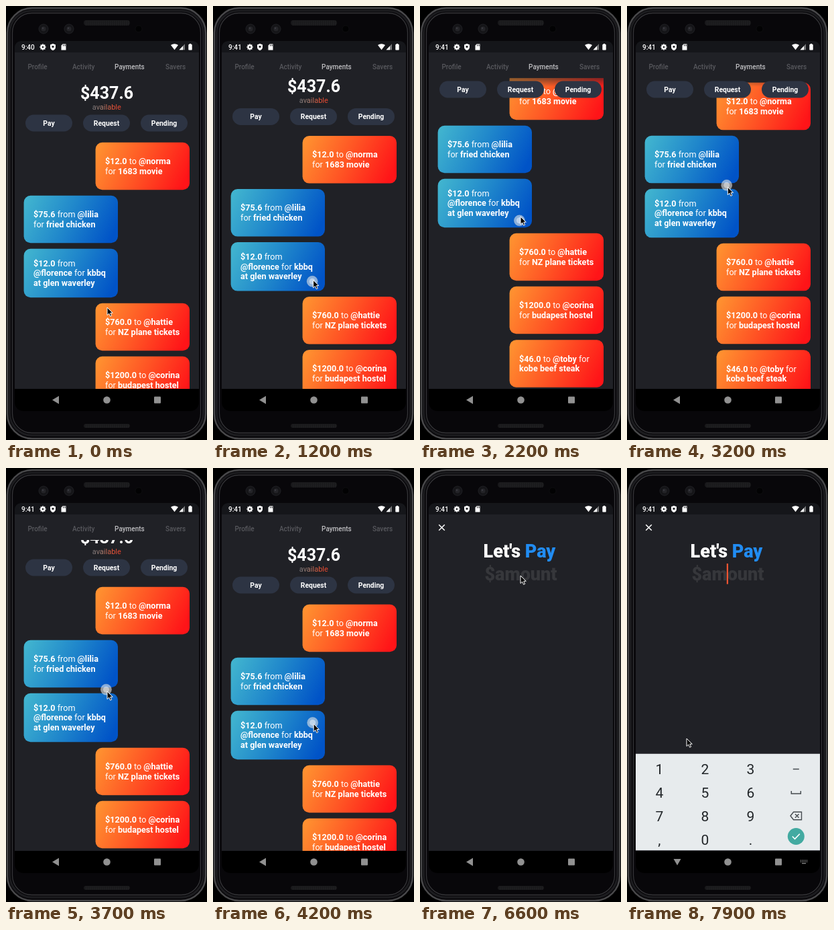
An HTML page with a canvas for the animation above (8000 ms loop, 300x645 px).

```html
<!DOCTYPE html>
<html lang="en">
<head>
<meta charset="utf-8">
<title>Payments app</title>
<style>
html, body { margin: 0; width: 300px; height: 645px; overflow: hidden; background: #000; }
canvas { display: block; width: 300px; height: 645px; }
</style>
</head>
<body>
<canvas id="stage"></canvas>
<script>
const LOOP = 8000, STEP = 100, MAX_SCROLL = 113, BG = '#202126';
const canvas = document.getElementById('stage');
const c = canvas.getContext('2d');
const dpr = window.devicePixelRatio || 1;
canvas.width = 300 * dpr;
canvas.height = 645 * dpr;

// [sent, top, lines]; asterisks toggle bold
const cards = [
  [1, 203, ['*$12.0* to *@norma', 'for *1683 movie']],
  [0, 282, ['*$75.6* from *@lilia', 'for *fried chicken']],
  [0, 361, ['*$12.0* from', '*@florence* for *kbbq', '*at glen waverley']],
  [1, 442, ['*$760.0* to *@hattie', 'for *NZ plane tickets']],
  [1, 521, ['*$1200.0* to *@corina', 'for *budapest hostel']],
  [1, 600.5, ['*$46.0* to *@toby* for', '*kobe beef steak']]
];

// [time, x, y] of the pointer tip
const path = [
  [0, 151, 448], [600, 151, 438], [900, 150, 416], [1700, 149, 393],
  [2200, 150, 313], [2600, 150, 246], [3000, 150, 244], [3700, 151, 332],
  [4300, 150, 390], [4600, 150, 392], [5300, 66, 178], [6000, 66, 178],
  [6500, 150, 160], [7100, 150, 160], [7800, 89, 402], [8000, 89, 402]
];
const touches = [[700, 4400], [5700, 5900], [6700, 6850]];

const clamp = (v, lo = 0, hi = 1) => Math.min(hi, Math.max(lo, v));
const ease = (t, from, to) => 1 - (1 - clamp((t - from) / (to - from))) ** 3;

function pointerAt(t) {
  t = clamp(t, 0, LOOP - 1);
  const i = path.findIndex(p => p[0] > t);
  const [t0, x0, y0] = path[i - 1], [t1, x1, y1] = path[i];
  const k = (t - t0) / (t1 - t0);
  return [x0 + (x1 - x0) * k, y0 + (y1 - y0) * k];
}

function scrollAt(t) {
  const grip = t < 2800 ? 417 : 358;
  return t > 4600 ? 0 : clamp(grip - pointerAt(t)[1], 0, MAX_SCROLL);
}

function rect(x, y, w, h, r, fill, stroke, width = 1) {
  c.beginPath();
  c.roundRect(x, y, w, h, r);
  paint(fill, stroke, width);
}

function disc(x, y, r, fill, stroke, width) {
  c.beginPath();
  c.arc(x, y, r, 0, Math.PI * 2);
  paint(fill, stroke, width);
}

function shape(d, x, y, fill, stroke, width) {
  c.save();
  c.translate(x, y);
  const p = new Path2D(d);
  if (fill) { c.fillStyle = fill; c.fill(p); }
  if (stroke) { c.strokeStyle = stroke; c.lineWidth = width || 1; c.stroke(p); }
  c.restore();
}

function paint(fill, stroke, width) {
  if (fill) { c.fillStyle = fill; c.fill(); }
  if (stroke) { c.strokeStyle = stroke; c.lineWidth = width; c.stroke(); }
}

function text(str, x, y, size, weight, color, align = 'center') {
  c.font = `${weight} ${size}px Roboto, sans-serif`;
  c.textAlign = align;
  c.fillStyle = color;
  c.fillText(str, x, y);
  return c.measureText(str).width;
}

function richText(str, x, y) {
  str.split('*').forEach((part, i) => {
    x += text(part, x, y, 12.6, i % 2 ? 700 : 400, '#fff', 'left');
  });
}

function gradient(x0, y0, x1, y1, ...stops) {
  const g = c.createLinearGradient(x0, y0, x1, y1);
  stops.forEach((s, i) => g.addColorStop(i / (stops.length - 1), s));
  return g;
}

function clipTo(x, y, w, h, draw) {
  c.save();
  c.beginPath();
  c.rect(x, y, w, h);
  c.clip();
  draw();
  c.restore();
}

function drawSpeaker(y, h) {
  rect(116, y, 69, h, h / 2, '#19191b');
  c.fillStyle = '#29292c';
  for (let x = 119; x < 183; x += 3)
    for (let row = 1.5; row < h - 1; row += 2.5) c.fillRect(x, y + row, 1.3, 1);
}

function drawPhone() {
  c.fillStyle = '#000';
  c.fillRect(0, 0, 300, 645);
  rect(2, 3, 296, 640, 37, '#08070a', '#48484a', 2.5);
  rect(5.5, 7, 289, 631, 33, null, '#1c1c1f', 3);
  rect(9.5, 10.5, 281, 624, 29, null, '#343437', 1.3);
  drawSpeaker(21, 8);
  drawSpeaker(621, 6);
  for (const x of [56, 94]) {
    disc(x, 34, 7, '#151518', '#202024', 1);
    disc(x, 34, 3.5, '#242428');
    disc(x - 1, 33, 1.2, '#3a3a40');
  }
  disc(198, 34, 5, '#020203', '#0e0e10', 1);
  rect(13, 52, 275, 550, [9, 9, 13, 13], '#000');
  rect(13, 52, 275, 18, [9, 9, 0, 0], '#15161a');
  c.fillStyle = BG;
  c.fillRect(13, 69, 275, 500);
}

function drawStatus(t) {
  text(t < 500 ? '9:40' : '9:41', 23, 65, 10, 500, '#fff', 'left');
  for (let a = 0; a < 8; a++) {
    c.save();
    c.translate(55, 61);
    c.rotate(a * Math.PI / 4);
    c.fillStyle = '#fff';
    c.fillRect(-1, -4.5, 2, 3);
    c.restore();
  }
  disc(55, 61, 2.5, null, '#fff', 1.8);
  shape('M0-5L4-3.4V0Q4 3.6 0 5Q-4 3.6-4 0V-3.4Z', 70, 61, '#fff');
  disc(70, 60.5, 1.6, '#15161a');
  shape('M-1.5-4.5H3.5V4.5H-3.5V-2.2Z', 86, 61, '#fff');
  c.fillStyle = '#15161a';
  for (const x of [84.8, 86.5, 88.1]) c.fillRect(x, 57.5, .8, 2);
  shape('M-5.5-3Q0-6.6 5.5-3L0 4.2Z', 251.5, 61, '#fff');
  shape('M4-4.5V4.5H-4.5Z', 263, 60.8, '#77787a');
  shape('M1-1.3V4.5H-4.5Z', 263, 60.8, '#fff');
  rect(272.3, 57, 5.4, 8.5, .8, '#fff');
  c.fillRect(273.7, 56, 2.6, 1.5);
}

function drawNav(typing) {
  const grey = '#919191';
  if (typing) {
    shape('M-5.5-4.5H5.5L0 5Z', 75, 585.5, grey);
    c.fillStyle = grey;
    for (let i = 0; i < 5; i++)
      for (let j = 0; j < 2; j++) c.fillRect(258.7 + i * 2.3, 582.5 + j * 2.2, 1.3, 1.2);
    c.fillRect(261, 587, 6, 1.2);
  } else {
    shape('M5-6V6L-5 0Z', 74, 585.5, grey);
  }
  disc(150.5, 585.5, 5.3, grey);
  rect(221, 580.5, 10, 10, 1, grey);
}

function drawCard([sent, top, lines], scroll) {
  const x = sent ? 133.6 : 26.6, y = top - scroll - .3, h = lines.length > 2 ? 72.5 : 70.5;
  const colors = sent ? ['#ff9030', '#ff5424', '#ff1418'] : ['#40b3cf', '#1f86cb', '#0053c7'];
  rect(x, y, 140.4, h, 10, gradient(x + 6, y + 4, x + 130, y + h - 6, ...colors));
  const first = lines.length > 2 ? 25.8 : 32.3;
  lines.forEach((line, i) => richText(line, x + 14.4, y + first + i * 14.8));
}

function drawPayments(scroll) {
  ['Profile', 'Activity', 'Payments', 'Savers'].forEach((tab, i) =>
    text(tab, 47 + i * 68.7, 93.7, 10, 500, i === 2 ? '#bfbfc2' : '#58595e'));
  clipTo(13, 107, 275, 462, () => {
    text('$437.6', 150.5, 138 - scroll, 25, 700, '#fff');
    text('available', 150.3, 154 - scroll, 11, 400,
      gradient(129, 0, 172, 0, '#77777a', '#a77d70', '#e3563a', '#e3402c'));
    cards.forEach(card => drawCard(card, scroll));
    const y = Math.max(124, 174 - scroll);
    c.fillStyle = gradient(0, y - 17, 0, y - 4, '#20212690', '#20212600');
    c.fillRect(13, y - 17, 275, 13);
    ['Pay', 'Request', 'Pending'].forEach((label, i) => {
      const x = 64 + i * 86;
      rect(x - 35, y - 12.5, 70, 25, 12.5, '#2d3443');
      text(label, x, y + 3.7, 10.4, 700, '#fff');
    });
  });
}

function drawPay(t) {
  c.globalAlpha = ease(t, 5900, 6300);
  c.fillStyle = BG;
  c.fillRect(13, 69, 275, 500);
  shape('M-4.3-4.3L4.3 4.3M4.3-4.3L-4.3 4.3', 32.5, 88.5, null, '#fff', 1.5);
  c.globalAlpha = ease(t, 5950, 6450);
  const w = text("Let's ", 94.6, 133.3, 27, 900, '#fff', 'left');
  text('Pay', 94.6 + w, 133.3, 27, 900, '#218cf2', 'left');
  text('$amount', 150.5, 166.6, 27, 900, '#36373b');
  c.globalAlpha = 1;
  if (t >= 6900 && (t - 6900) % 1000 < 500) {
    c.fillStyle = '#fa5532';
    c.fillRect(148.8, 142, 2.2, 30.5);
  }
}

function drawKeyboard(t) {
  const ink = '#222629', soft = '#454b4f';
  clipTo(13, 424.5, 275, 144, () => {
    c.translate(0, 144 * (1 - ease(t, 6850, 7200)));
    c.fillStyle = '#e7ebed';
    c.fillRect(13, 424.5, 275, 144);
    ['1', '2', '3', '4', '5', '6', '7', '8', '9', ',', '0', '.'].forEach((key, i) =>
      text(key, 48.4 + i % 3 * 68, 454.7 + Math.floor(i / 3) * 35, 21, 400, ink));
    shape('M-4.5 0H4.5', 252.3, 447.5, null, soft, 1.7);
    shape('M-7-2.5V1.5H7V-2.5', 252.3, 482.5, null, soft, 1.5);
    shape('M-8.5 0L-4-5.7H8V5.7H-4ZM-1.5-2.8L4 2.8M4-2.8L-1.5 2.8', 252.5, 517, null, soft, 1.4);
    disc(252.3, 547.5, 12.5, '#43aaa1');
    shape('M-5.5 0L-1.8 3.8L5.5-3.8', 252.3, 547.5, null, '#fff', 1.6);
  });
}

function drawPointer(t) {
  const [x, y] = pointerAt(t);
  if (touches.some(([from, to]) => t >= from && t < to)) {
    const [px, py] = pointerAt(t - 30);
    disc(px - 1.5, py + 1, 8, '#e4e8ea99', '#c8ccd060', 1);
    disc(px - 1.5, py + 1, 4.5, '#ffffff70');
  }
  shape('M0 0V11.5L2.7 9L4.6 13.2L6.6 12.3L4.8 8.2H8.3Z', x, y, '#000', '#fff', 1);
}

function draw(now) {
  const t = Math.floor(now % LOOP / STEP) * STEP;
  c.setTransform(dpr, 0, 0, dpr, 0, 0);
  drawPhone();
  drawStatus(t);
  if (t < 6300) drawPayments(scrollAt(t));
  if (t > 5900) drawPay(t);
  if (t > 6850) drawKeyboard(t);
  drawNav(t >= 6900);
  drawPointer(t);
}

const start = performance.now();
(function frame() {
  draw(performance.now() - start);
  requestAnimationFrame(frame);
})();
</script>
</body>
</html>
```
